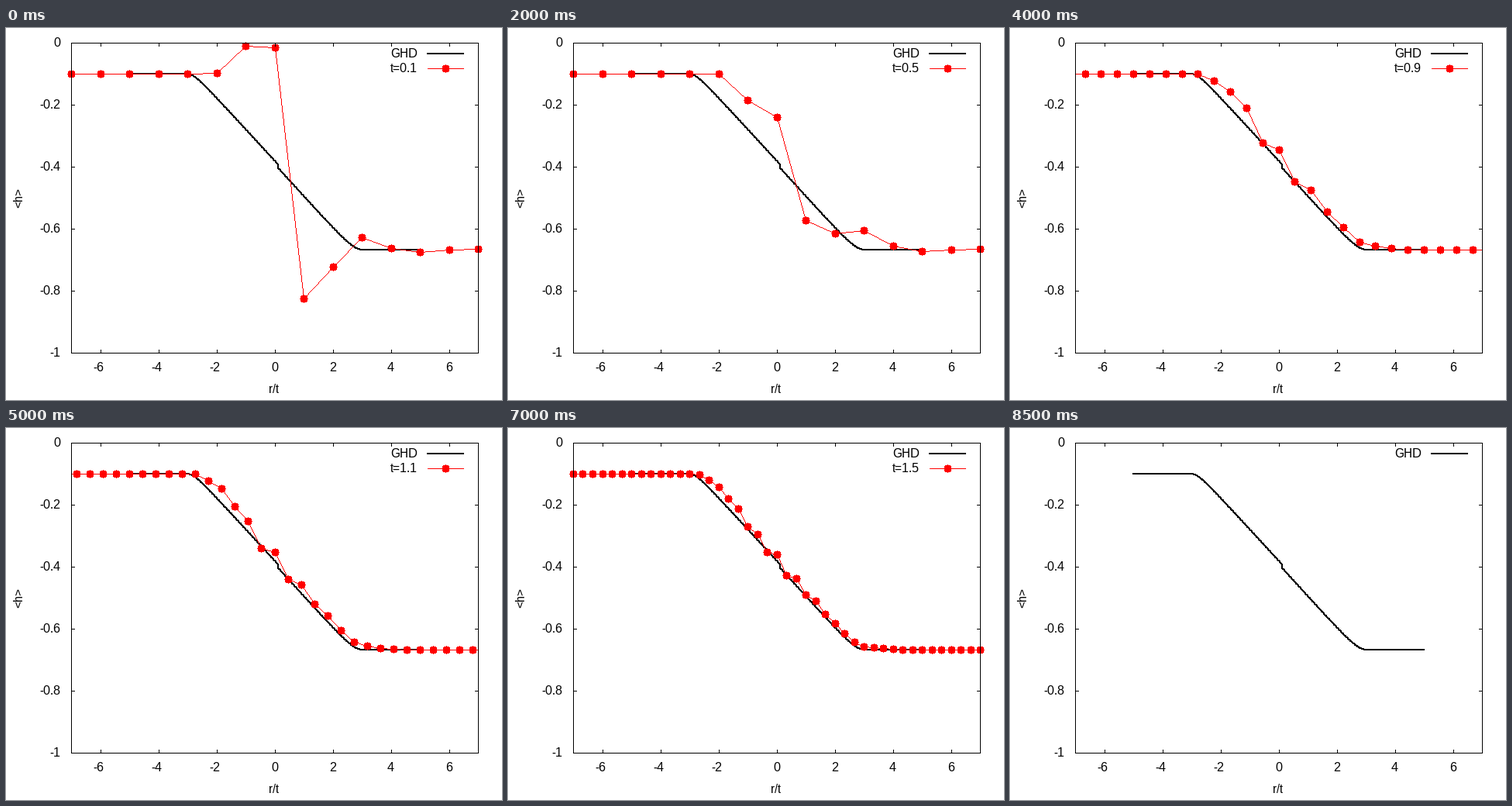
A matplotlib script that plays this animation: 640x480 px, repeating every 9000 ms.

```python
import numpy as np
import matplotlib.pyplot as plt
from matplotlib.animation import FuncAnimation

plt.rcParams.update({"font.family": "Liberation Sans",
                     "text.hinting": "default", "text.hinting_factor": 1})

W, H, DPI = 640, 480, 80
LEFT, RIGHT, TOP, BOTTOM = 84, 609, 19, 419
BLACK, RED = (0, 0, 0), (255, 0, 0)
FRAMES, INTERVAL = 18, 500

LOW, HIGH = -0.1, -0.667           # plateaus left and right
SITES = np.arange(-30, 31)
CORE = slice(28, 38)               # sites -2 to 7, disturbed by the quench
START = [-.098, 0, 0, -.84, -.73, -.63, -.664, -.676, -.668, -.665]
MIDDLE = [-.1, -.184, -.24, -.572, -.615, -.605, -.655, -.673, -.668, -.665]
SETTLED = 1.8                      # time from which the scaling form holds


# Physics
def ramp(u, slope, width):
    """Rises from zero and bends softly into a straight line."""
    u = np.maximum(u, 0)
    return slope * (u - width * (1 - np.exp(-u / width)))


def ghd(x):
    return np.where(x < 0.13, LOW - ramp(x + 3, 0.1015, 0.24),
                    HIGH + ramp(3 - x, 0.1025, 0.31))


def quench(core):
    h = np.where(SITES <= 0, LOW, HIGH)
    h[CORE] = core
    return h


def scaling(time):
    """Front plus corrections that fade as 1/time."""
    x = SITES / time
    bump = 0.105 * np.exp(-((x + 2.2 - 1.2 / time) / 0.9) ** 2)
    shelf = 0.037 * np.exp(-((x - 1.7) / 1.9) ** 4)
    ripple = 0.04 * (-1.0) ** SITES * np.exp(-(SITES / (1.3 * time)) ** 2)
    return np.clip(ghd(x) + (bump + shelf + ripple) / time, HIGH, LOW)


def energy(time):
    start, middle = quench(START), quench(MIDDLE)
    if time <= 1:
        return start + (middle - start) * time ** 2 * (3 - time ** 2) / 2
    u = min((time - 1) / (SETTLED - 1), 1)
    late = scaling(max(time, SETTLED))
    return middle + (late - middle) * (1 - (1 - u) ** 2)


# Pixel drawing
def snap(v):
    return np.floor(np.asarray(v, float) + 0.5).astype(int)


def to_px(x):
    return snap(LEFT + 37.5 * (np.asarray(x) + 7))


def to_py(h):
    return snap(TOP - 400 * np.asarray(h))


def stroke(img, xs, ys, color, width=1):
    for x0, y0, x1, y1 in zip(xs[:-1], ys[:-1], xs[1:], ys[1:]):
        n = max(abs(x1 - x0), abs(y1 - y0)) + 1
        x, y = snap(np.linspace(x0, x1, n)), snap(np.linspace(y0, y1, n))
        for dx in range(width):
            for dy in range(width):
                img[y - dy, x - dx] = color


GRID_Y, GRID_X = np.mgrid[-5:6, -5:6]
DISC = GRID_X ** 2 + GRID_Y ** 2 <= 25


def dot(img, x, y):
    img[y - 5:y + 6, x - 5:x + 6][DISC] = RED


def draw_frame(img):
    stroke(img, [LEFT, RIGHT, RIGHT, LEFT, LEFT],
           [TOP, TOP, BOTTOM, BOTTOM, TOP], BLACK)
    for x in to_px(np.arange(-6, 7, 2)):
        stroke(img, [x, x], [TOP, TOP + 4], BLACK)
        stroke(img, [x, x], [BOTTOM - 4, BOTTOM], BLACK)
    for y in range(TOP, BOTTOM + 1, 80):
        stroke(img, [LEFT, LEFT + 4], [y, y], BLACK)
        stroke(img, [RIGHT - 4, RIGHT], [y, y], BLACK)


def draw_sites(img, time, spread):
    x, h = SITES / spread, energy(time)
    inside = np.abs(x) < 7 + 1e-6
    line_x = np.r_[-7, x[inside], 7]
    stroke(img, to_px(line_x), to_py(np.interp(line_x, x, h)), RED)
    stroke(img, [544, 590], [52, 52], RED)
    for px, py in zip(to_px(x[inside]), to_py(h[inside])):
        dot(img, px, py)
    dot(img, 567, 52)


base = np.full((H, W, 3), 255, np.uint8)
curve_x = np.linspace(-5, 5, 500)
stroke(base, to_px(curve_x), to_py(ghd(curve_x)), BLACK, 2)
stroke(base, [544, 590], [33, 33], BLACK, 2)

fig = plt.figure(figsize=(W / DPI, H / DPI), dpi=DPI, facecolor="white")
plot = fig.figimage(base, origin="upper", zorder=-1)
ax = fig.add_axes([0, 0, 1, 1])
ax.set_xlim(0, W)
ax.set_ylim(H, 0)
ax.axis("off")


def label(x, y, s, ha="center", **kw):
    return ax.text(x, y, s, fontsize=16 * 72 / DPI, ha=ha, va="baseline",
                   **kw)


for v in range(-6, 7, 2):
    label(to_px(v) - (3 if v < 0 else 0.5), 443, str(v))
for k in range(6):
    label(70.5, TOP + 80 * k + 5, f"{-k / 5:g}" if k else "0", ha="right")
label(345, 471, "r/t")
label(21, 219.5, "<h>", rotation=90, rotation_mode="anchor")
label(496.5, 38, "GHD", ha="left")
key = label(496, 57, "", ha="left")


def draw(i):
    img = base.copy()
    if i < FRAMES - 1:
        time = 0.2 * (i + 1)
        draw_sites(img, time, time if i else 1.0)
        key.set_text(f"t={time / 2:.1f}")
    else:
        key.set_text("")
    draw_frame(img)
    plot.set_data(img)
    return plot, key


anim = FuncAnimation(fig, draw, frames=FRAMES, interval=INTERVAL,
                     repeat=True, repeat_delay=0, blit=False)
plt.show()
```
